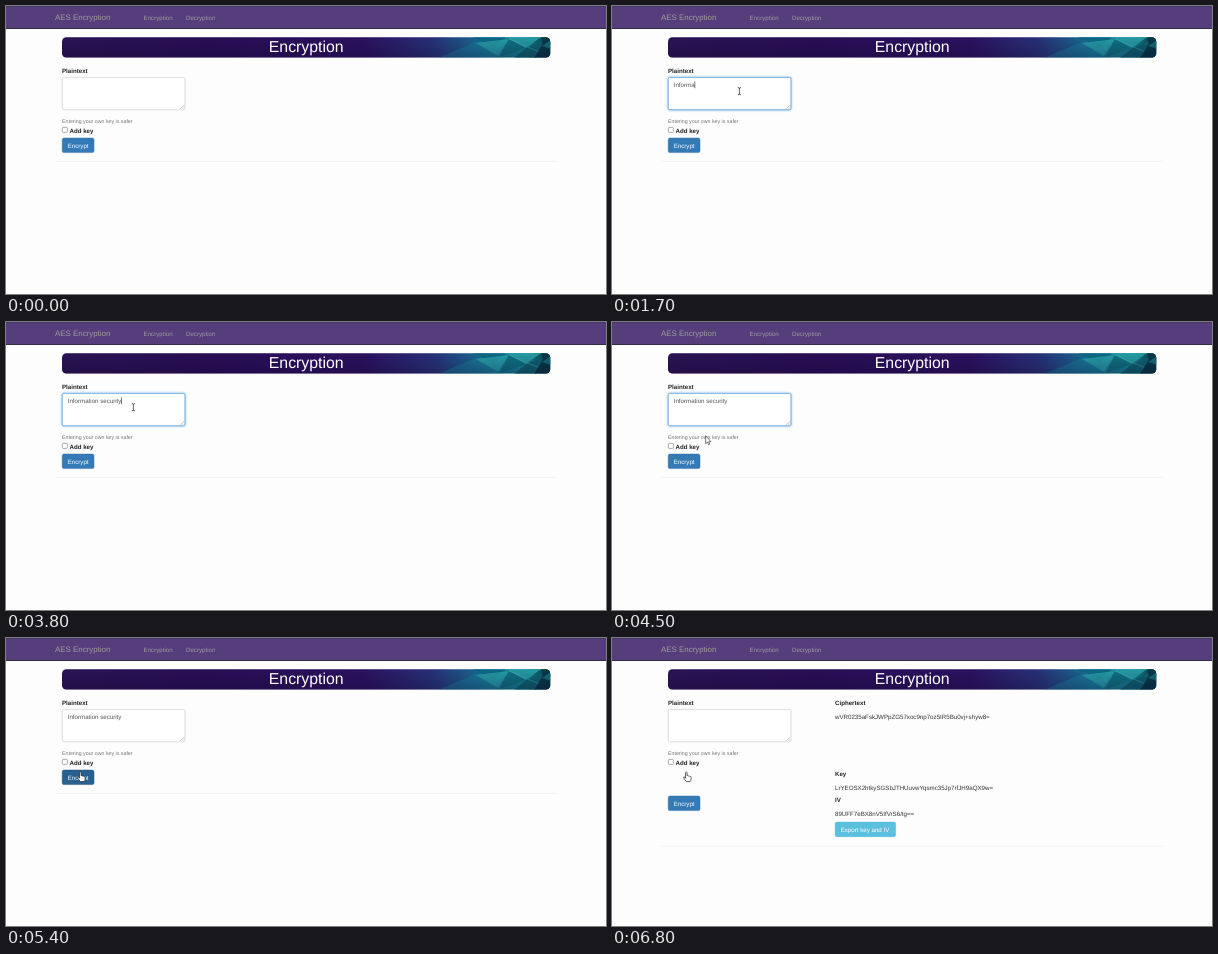
An HTML page for the animation above (6.9 s loop, 600x288 px).

```html
<!DOCTYPE html>
<html lang="en">
<head>
<meta charset="utf-8">
<title>Encryption form</title>
<style>
  html, body { margin: 0; width: 100%; height: 100%; overflow: hidden; background: #fefdfe; }
  svg { display: block; width: 600px; height: 288px; }
  text { font-family: "Liberation Sans", Arial, sans-serif; font-size: 6.16px; fill: #333; white-space: pre; text-rendering: geometricPrecision; }
  .bold { font-weight: bold; fill: #222; }
  .nav { fill: #9d9d9d; }
  .brand { font-size: 7.92px; }
  .title { font-size: 15.84px; fill: #fff; text-anchor: middle; }
  .hint { font-size: 5.28px; fill: #737373; }
  .typed { fill: #555; }
  .label { fill: #fff; }
</style>
</head>
<body>
<svg viewBox="0 0 600 288" xmlns="http://www.w3.org/2000/svg">
  <defs>
    <linearGradient id="bannerFill">
      <stop offset="0" stop-color="#2c1556"/>
      <stop offset=".3" stop-color="#2a0f58"/>
      <stop offset=".62" stop-color="#2d1362"/>
      <stop offset=".76" stop-color="#28357c"/>
      <stop offset=".87" stop-color="#147a98"/>
      <stop offset=".95" stop-color="#128f9c"/>
      <stop offset="1" stop-color="#07333f"/>
    </linearGradient>
    <linearGradient id="bannerShade" x2="0" y2="1">
      <stop offset="0" stop-color="#12042e" stop-opacity=".05"/>
      <stop offset="1" stop-color="#12042e" stop-opacity=".35"/>
    </linearGradient>
    <clipPath id="bannerClip"><rect x="56" y="31.2" width="488.2" height="20.4" rx="4.4"/></clipPath>
    <filter id="blur" x="-10%" y="-30%" width="120%" height="160%"><feGaussianBlur stdDeviation="1.3"/></filter>
  </defs>

  <rect width="600" height="288" fill="#fefdfe"/>
  <rect width="600" height="22.6" fill="#563d7c"/>
  <rect width="600" height=".5" fill="#3c2a58"/>
  <rect y="22" width="600" height=".8" fill="#1c1329"/>
  <text class="nav brand" x="49" y="13.8">AES Encryption</text>
  <text class="nav" x="137.6" y="13.5">Encryption</text>
  <text class="nav" x="180" y="13.5">Decryption</text>

  <g clip-path="url(#bannerClip)">
    <rect x="56" y="31" width="489" height="21" fill="url(#bannerFill)"/>
    <path d="M432 52L470 36L492 31L498 52Z" fill="#1a8fa8" opacity=".45"/>
    <path d="M466 31L500 31L488 41Z" fill="#0b6c86" opacity=".8"/>
    <path d="M470 37L503 33L492 50Z" fill="#2bb0b4" opacity=".75"/>
    <path d="M503 33L520 42L494 51Z" fill="#0d7784"/>
    <path d="M500 31L535 31L520 42Z" fill="#25a3a8"/>
    <path d="M520 42L537 35L530 52L508 52Z" fill="#0c6873"/>
    <path d="M503 33L536 47" stroke="#54ccc9" stroke-width=".6" opacity=".7"/>
    <path d="M535 31L545 31L545 52L528 52L537 38Z" fill="#073b46"/>
    <path d="M536 40L545 34L545 43Z" fill="#146f77"/>
    <rect x="56" y="31" width="489" height="21" fill="url(#bannerShade)"/>
  </g>
  <text class="title" x="300.2" y="45.6">Encryption</text>

  <text class="bold" x="56" y="66.9">Plaintext</text>
  <rect id="glow" x="55.6" y="70.8" width="124" height="33.6" rx="2" fill="#66afe9" filter="url(#blur)"/>
  <rect x="56.2" y="71.4" width="122.8" height="32.4" rx="1.6" fill="#fff" stroke="#c4c4c4" stroke-width=".6"/>
  <path d="M57 72H178.4" stroke="#eee" stroke-width=".5"/>
  <rect id="ring" x="56.2" y="71.4" width="122.8" height="32.4" rx="1.6" fill="none" stroke="#66afe9" stroke-width=".8"/>
  <path d="M174.4 102.8L178 99.2M176.6 102.8L178 101.4" stroke="#888" stroke-width=".5"/>
  <text class="typed" id="typed" x="61.7" y="80.8"></text>
  <rect id="caret" y="75.4" width=".6" height="6.8" fill="#222"/>

  <text class="hint" x="56" y="116.9">Entering your own key is safer</text>
  <rect x="56.4" y="121.4" width="5" height="5" rx=".8" fill="#fff" stroke="#767676" stroke-width=".6"/>
  <text class="bold" x="63.5" y="126.8">Add key</text>

  <g id="button">
    <rect id="face" x="56.2" y="132" width="31.8" height="14.6" rx="1.7" stroke-width=".45"/>
    <text class="label" x="61.7" y="141.5">Encrypt</text>
  </g>
  <path id="rule" d="M49 155.3H551" stroke="#eaeaea" stroke-width=".6"/>

  <g id="result">
    <text class="bold" x="223" y="66.9">Ciphertext</text>
    <text x="223" y="80.9">wVR0235aFskJWPpZG57xoc9np7oz5IR5Bu0vj+shyw8=</text>
    <text class="bold" x="223" y="137.8">Key</text>
    <text x="223" y="151.8">LrYEOSX2htkySGSbJTHUuvwYqsmc35Jp7rfJH9aQX9w=</text>
    <text class="bold" x="223" y="164.1">IV</text>
    <text x="223" y="178.1">89UFF7eBX8nV5IfVrS6/tg==</text>
    <rect x="223.2" y="184.1" width="60.4" height="14.6" rx="1.7" fill="#5bc0de" stroke="#46b8da" stroke-width=".45"/>
    <text class="label" x="228.7" y="193.6">Export key and IV</text>
  </g>

  <g id="cursor">
    <path id="beam" d="M-1.6 -3.6Q0 -3.6 0 -2.8Q0 -3.6 1.6 -3.6M0 -3V3M-1.6 3.6Q0 3.6 0 2.8Q0 3.6 1.6 3.6" fill="none" stroke="#222" stroke-width=".7"/>
    <path id="arrow" d="M-2 -4V4L-.2 2.4L1 5L2.1 4.5L1 2H3.4Z" fill="#fff" stroke="#222" stroke-width=".6"/>
    <path id="hand" d="M-1.5 1.4V-4.2Q-.7 -5.4 .1 -4.2V-1.1Q.9 -1.7 1.6 -.8Q2.4 -1.2 2.9 -.3Q3.9 -.6 4.1 .6V2.2Q3.9 3.6 3.1 4.8H-.7Q-1.8 3.4 -3.5 1Q-3.4 -.5 -2.3 .3Z" fill="#fff" stroke="#222" stroke-width=".7" stroke-linejoin="round"/>
  </g>
</svg>
<script>
const LOOP = 6900, STEP = 100;
const FOCUS = 400, PRESS = 5200, DONE = 5700;
const MESSAGE = "Information security";
const KEYS = [10, 12, 13, 14, 15, 16, 17, 19, 20, 22, 23, 24, 26, 27, 29, 30, 33, 35, 37, 38].map(k => k * STEP);

const el = {};
document.querySelectorAll("svg [id]").forEach(n => el[n.id] = n);
const set = (name, attr, value) => el[name].setAttribute(attr, value);
const show = (name, on) => set(name, "visibility", on ? "visible" : "hidden");
const clamp = v => Math.max(0, Math.min(1, v));
const mix = (a, b, p) => a + (b - a) * p;

function drawField(t) {
  const typed = t < DONE ? KEYS.filter(k => k <= t).length : 0;
  const focus = clamp((t - FOCUS + 100) / 200) * clamp(1 - (t - PRESS) / 150);
  set("glow", "opacity", focus * 0.65);
  set("ring", "opacity", focus);
  el.typed.textContent = MESSAGE.slice(0, typed);
  set("caret", "x", 61.7 + (typed ? el.typed.getComputedTextLength() : 0));
  const lastKey = typed ? KEYS[typed - 1] : FOCUS;
  show("caret", t >= FOCUS && t < PRESS && (t - lastKey) % 1000 < 500);
}

function drawCursor(t) {
  const p = clamp((t - 4100) / 700), ease = p * p * (3 - 2 * p);
  const x = mix(127.4, 75, ease), y = mix(85.2, 138.8, ease);
  const kind = y < 104 ? "beam" : y < 132 ? "arrow" : "hand";
  set("cursor", "transform", `translate(${x} ${y})`);
  for (const name of ["beam", "arrow", "hand"]) show(name, t >= FOCUS && name === kind);
  return kind === "hand" && x < 88;
}

function draw(time) {
  const t = Math.floor((time % LOOP) / STEP) * STEP;
  const done = t >= DONE;
  drawField(t);
  const hover = drawCursor(t) && !done;
  const pressed = t >= PRESS && t < PRESS + 200;
  set("face", "fill", pressed ? "#204d74" : hover ? "#286090" : "#337ab7");
  set("face", "stroke", hover ? "#204d74" : "#2e6da4");
  set("button", "transform", `translate(0 ${done ? 26 : 0})`);
  set("rule", "transform", `translate(0 ${done ? 52.8 : 0})`);
  show("result", done);
}

const start = performance.now();
function tick() {
  draw(performance.now() - start);
  requestAnimationFrame(tick);
}
tick();
</script>
</body>
</html>
```
